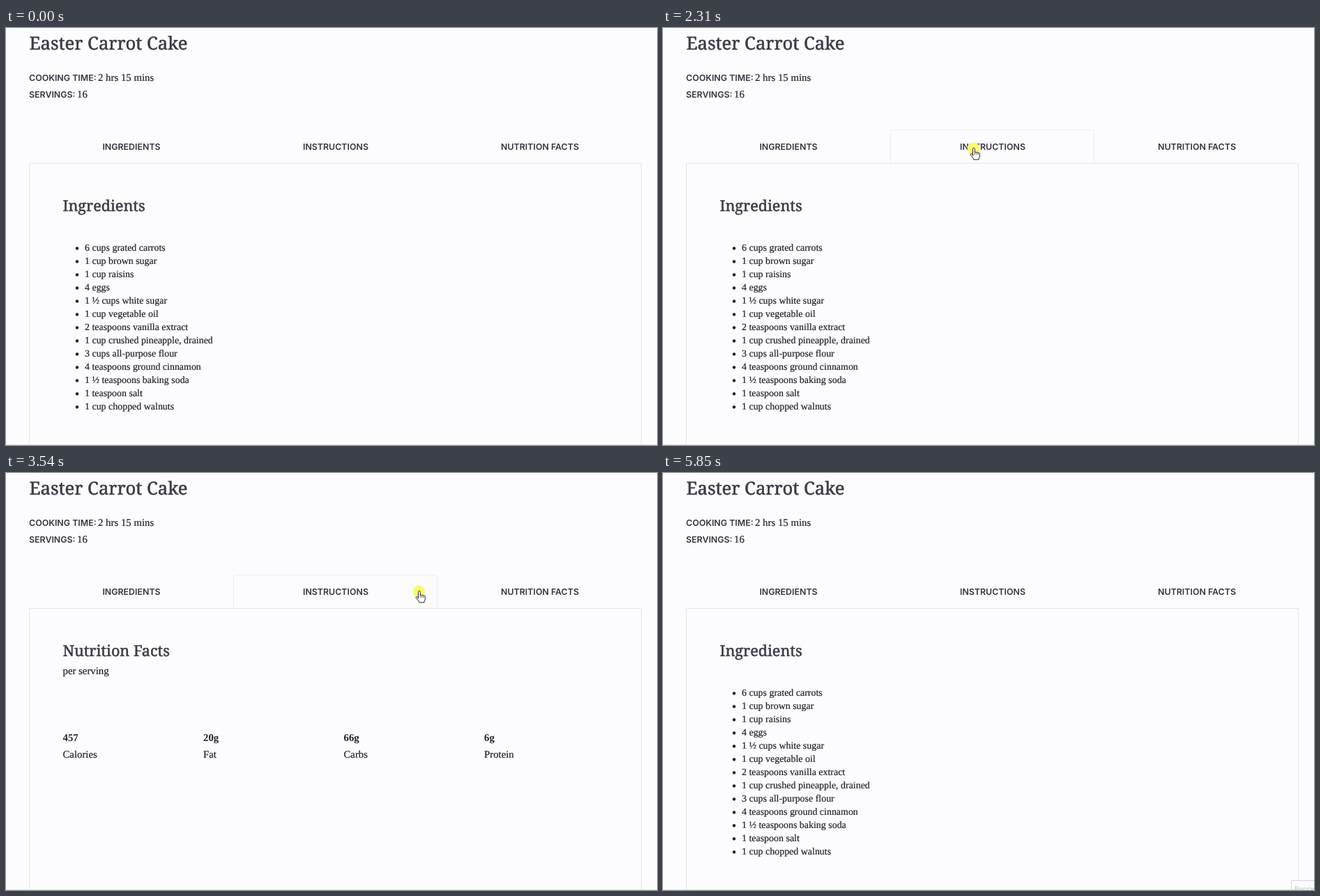
Write an HTML page that moves like this. It is 934 by 599 pixels and loops after 5920 ms.

```html
<!DOCTYPE html>
<html lang="en">
<head>
<meta charset="utf-8">
<title>Recipe tabs</title>
<style>
  html, body { margin: 0; width: 100%; height: 100%; overflow: hidden; background: #fcfcff; }
  svg { display: block; }
  text { white-space: pre; text-rendering: geometricPrecision; }
  .head { font-family: "Noto Serif", serif; fill: #3b3b47; stroke: #3b3b47; stroke-width: .55px; }
  .h1 { font-size: 25.7px; }
  .h2 { font-size: 21.6px; }
  .label { font: 600 12.4px Inter, sans-serif; fill: #34343f; }
  .body { font: 13.95px "Liberation Serif", serif; fill: #212126; stroke: #212126; stroke-width: .2px; }
  .big { font-size: 14.8px; }
  .bold { font-weight: 700; stroke: none; }
  .mid { text-anchor: middle; }
  .tip { font: 10px Inter, sans-serif; fill: #b9b9bd; }
  .line { fill: none; stroke: #e3e3e8; }
  .soft { fill: none; stroke: #eeeef1; }
  .ink { fill: #fff; stroke: #26262c; stroke-linejoin: round; }
</style>
</head>
<body>
<svg width="934" height="599" viewBox="0 0 934 599">
  <path class="line" d="M33.5 599V194.5H911.5V599"/>
  <path id="outline" class="soft" d="M0 194V149.5Q0 146.5 3 146.5H289Q292 146.5 292 149.5V194"/>
  <g id="page"></g>
  <g id="lang">
    <path d="M901.5 599V585.5H935V599" fill="#fcfcff" stroke="#d6d6da"/>
    <text class="tip" x="906" y="600.5">Русский</text>
  </g>
  <path class="line" d="M0 598.5H934"/>
  <g id="cursor">
    <circle id="press" cx="-.7" cy="1" r="8.8" fill="#fdfa70"/>
    <g id="hand">
      <path class="ink" d="M-1.5 11.5V1.7a1.4 1.4 0 0 1 2.8 0V7a1.3 1.3 0 0 1 2.5.2a1.3 1.3 0 0 1 2.4.4a1.2 1.2 0 0 1 2.2.8V12q0 2-1.3 3.2V17H-.5V15.6L-4.6 10.5q-.8-1.4.4-1.9q1-.2 2.7 2.1z"/>
      <path d="M1.3 7v3M3.8 7.2V10M6.2 7.6V10" fill="none" stroke="#26262c" stroke-width=".8"/>
    </g>
    <path id="arrow" class="ink" d="M0 0V14L3.2 11L5.4 16L7.6 15L5.4 10.2H10z"/>
  </g>
</svg>
<script>
const LOOP = 5920, STEP = 70;
const TAB_LEFT = 33.5, TAB_WIDTH = 293, LINE = 19;
const $ = id => document.getElementById(id);

function add(parent, tag, attrs, content = '') {
  const el = document.createElementNS('http://www.w3.org/2000/svg', tag);
  for (const key in attrs) el.setAttribute(key, attrs[key]);
  el.textContent = content;
  return parent.appendChild(el);
}
const write = (parent, cls, x, y, content) => add(parent, 'text', { class: cls, x, y }, content);

const page = $('page');
write(page, 'head h1', 33.5, 31, 'Easter Carrot Cake');
write(page, 'label', 33, 76, 'COOKING TIME:');
write(page, 'body big', 132, 76, '2 hrs 15 mins');
write(page, 'label', 33, 100, 'SERVINGS:');
write(page, 'body big', 102, 99.5, '16');

const panels = ['Ingredients', 'Instructions', 'Nutrition Facts'].map((title, i) => {
  write(page, 'label mid', TAB_LEFT + TAB_WIDTH * (i + .5), 175, title.toUpperCase());
  const panel = add(page, 'g', {});
  write(panel, 'head h2', 81.5, 263, title);
  return panel;
});

[
  '6 cups grated carrots', '1 cup brown sugar', '1 cup raisins', '4 eggs',
  '1 ½ cups white sugar', '1 cup vegetable oil', '2 teaspoons vanilla extract',
  '1 cup crushed pineapple, drained', '3 cups all-purpose flour',
  '4 teaspoons ground cinnamon', '1 ½ teaspoons baking soda',
  '1 teaspoon salt', '1 cup chopped walnuts'
].forEach((item, i) => {
  const y = 320 + LINE * i;
  add(panels[0], 'circle', { cx: 102, cy: y - 3.5, r: 2.2, fill: '#212126' });
  write(panels[0], 'body', 113, y, item);
});

let lineY = 320;
[
  ['Combine grated carrots and brown sugar in a medium bowl. Let sit for 1 hour, then stir in raisins.'],
  ['Preheat the oven to 350 degrees F (175 degrees C). Grease and flour two 10-inch round cake pans.'],
  ['Beat eggs in a large bowl until light. Gradually beat in white sugar, oil, and vanilla. Stir in pineapple. Combine flour,',
    'cinnamon, baking soda, and salt in a separate bowl, then stir into egg mixture until absorbed. Stir in carrot mixture and walnuts.',
    'Pour evenly into the prepared pans.'],
  ['Bake in the preheated oven until an inserted toothpick comes out clean, 45 to 50 minutes. Cool for 10 minutes before',
    'removing cake layers from the pans; let cool completely.']
].forEach((lines, i) => {
  lines.forEach((line, j) => {
    write(panels[1], 'body', 138.3, lineY, j ? line : `Step ${i + 1} ${line}`);
    lineY += LINE;
  });
  lineY += 12.8;
});

write(panels[2], 'body big', 81.5, 289, 'per serving');
['457 Calories', '20g Fat', '66g Carbs', '6g Protein'].forEach((fact, i) => {
  const x = 81.5 + 201.5 * i, [value, name] = fact.split(' ');
  write(panels[2], 'body big bold', x, 385, value);
  write(panels[2], 'body big', x, 409, name);
});

// Key points of the pointer; it eases from each to the next
const stops = [
  { t: 70, x: 770, y: 477, lift: 205 },
  { t: 540, x: 120, y: 175 },
  { t: 1670, x: 120, y: 177 },
  { t: 2160, x: 446, y: 172 },
  { t: 2560, x: 446, y: 172 },
  { t: 2980, x: 741, y: 173 },
  { t: 3210, x: 741, y: 173 },
  { t: 3540, x: 593, y: 169 },
  { t: 3810, x: 246, y: 166 },
  { t: 4090, x: 227, y: 163.5 },
  { t: 4440, x: 813, y: 562 },
  { t: 4790, x: 893, y: 606 }
];
const clicks = [670, 2310, 3050, 3540, 4090];
const ENTER = stops[0].t, LEAVE = stops.at(-1).t;
const ARRIVE = stops[1].t, LAST_CLICK = clicks.at(-1), RESET = 5800;

function pointer(t) {
  const i = Math.max(0, stops.findLastIndex(s => s.t <= t));
  const a = stops[i], b = stops[i + 1] || a;
  const n = Math.round((b.t - a.t) / STEP) || 1;
  const u = b === a ? 0 : Math.max(0, Math.floor((t - a.t) * n / (b.t - a.t)) / n);
  const s = u * u * (3 - 2 * u);
  return {
    x: a.x + (b.x - a.x) * s,
    y: a.y + (b.y - a.y) * s - (a.lift || 0) * Math.sin(Math.PI * s)
  };
}

const tabAt = t => Math.floor((pointer(t).x - TAB_LEFT) / TAB_WIDTH);
const show = (el, on) => el.setAttribute('visibility', on ? 'visible' : 'hidden');

function draw(now) {
  const t = now % LOOP;

  // A click opens the tab under the pointer one step later
  const opened = clicks.findLast(c => c + STEP <= t);
  const view = opened ? tabAt(opened) : 0;
  panels.forEach((panel, i) => show(panel, i === view));

  // The last tab touched keeps its outline until the reset
  const tab = tabAt(Math.max(ARRIVE, Math.min(t, LAST_CLICK)));
  show($('outline'), t >= ARRIVE && t < RESET);
  $('outline').setAttribute('transform', `translate(${TAB_LEFT + TAB_WIDTH * tab} 0)`);

  const { x, y } = pointer(t);
  const active = t >= ENTER && t < LEAVE, onTab = y > 146 && y < 194;
  $('cursor').setAttribute('transform', `translate(${x} ${y})`);
  show($('hand'), active && onTab);
  show($('arrow'), active && !onTab);
  show($('press'), clicks.some(c => t >= c && t < c + 1.5 * STEP));

  show($('lang'), t >= RESET);
  $('lang').setAttribute('opacity', t < RESET + 50 ? .5 : 1);
}

const begin = performance.now();
function tick() {
  draw(performance.now() - begin);
  requestAnimationFrame(tick);
}
tick();
</script>
</body>
</html>
```
